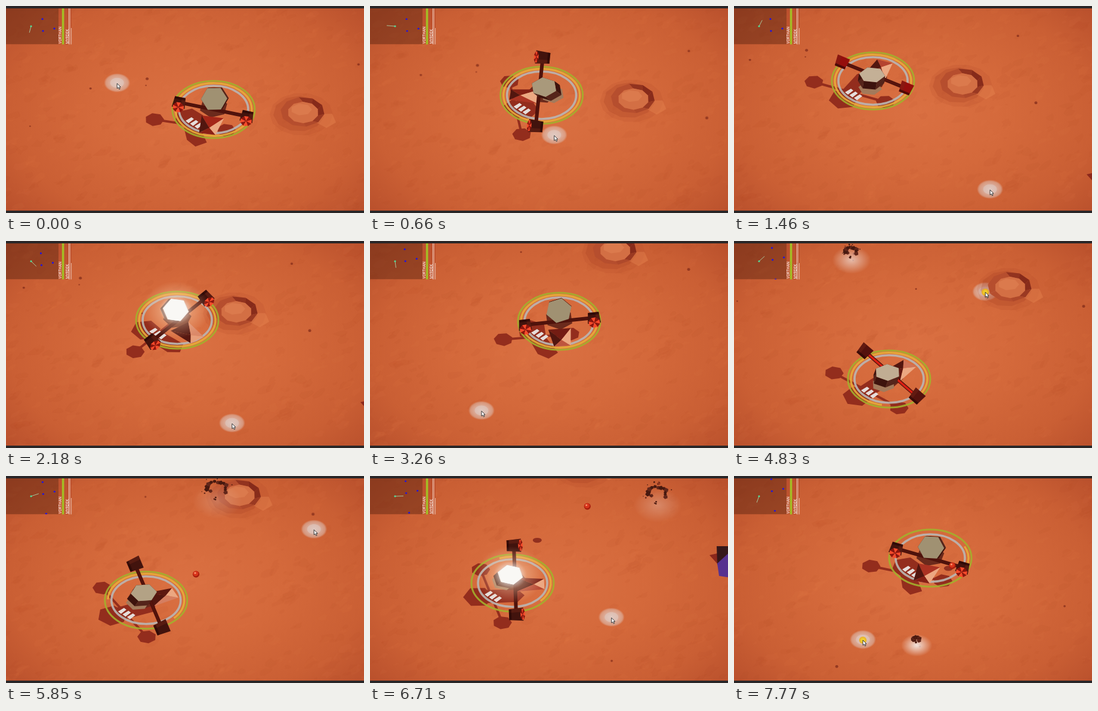
An HTML page with a canvas for the animation above (7810 ms loop, 600 by 348 pixels).

```html
<!DOCTYPE html>
<html lang="en">
<head>
<meta charset="utf-8">
<title>Red planet lander</title>
<style>
html, body { margin: 0; width: 100%; height: 100%; overflow: hidden; background: #2a2728; }
canvas { display: block; }
</style>
</head>
<body>
<canvas id="stage" width="600" height="348"></canvas>
<script>
const g = document.getElementById('stage').getContext('2d');
const LOOP = 7.81, FLIGHT = 0.55, ARM = 58, TAU = Math.PI * 2;
const { sin, cos, max, min, abs } = Math;

// time, ship x y, crater offset from the ship x y, heading in degrees
const SHIP = [
  [0, 348, 174, 149, 4, 101.5],
  [1.46, 233, 126, 149, 4, 292],
  [2.18, 287, 133, 98, -15, 411],
  [3.26, 317, 135, 93, -120, 444],
  [4.1, 330, 205, 150, -138, 560],
  [4.83, 260, 232, 202, -155, 671],
  [6.71, 239, 180, 121, -200, 718],
  [7.77, 329, 138, 180, -250, 826]
];
const CURSOR = [
  [0, 186, 130], [1.46, 429, 309], [2.18, 379, 307], [3.26, 187, 286], [4.1, 215, 22],
  [4.83, 421, 86], [5.7, 520, 110], [6.35, 455, 20], [6.71, 405, 238], [7.2, 215, 335], [7.77, 216, 276]
];
const CLICKS = [4.1, 4.85, 5.75, 6.43, 7.22, 7.76];
const THRUST = [[1.85, 2.5], [3.8, 4.3], [6.35, 7.05]];

function random(seed) {
  return () => (seed = (seed * 16807) % 2147483647) / 2147483647;
}

// smooth interpolation through rows of [time, ...values]
function track(rows, t) {
  let i = 0;
  while (i < rows.length - 2 && t > rows[i + 1][0]) i++;
  const a = rows[i], b = rows[i + 1], d = b[0] - a[0], u = min(1, (t - a[0]) / d);
  const p = rows[max(0, i - 1)], n = rows[min(rows.length - 1, i + 2)];
  return a.slice(1).map((v, k) => {
    const w = b[k + 1];
    const m0 = (w - p[k + 1]) / (b[0] - p[0]) * d, m1 = (n[k + 1] - v) / (n[0] - a[0]) * d;
    const u2 = u * u, u3 = u2 * u;
    return v * (2 * u3 - 3 * u2 + 1) + m0 * (u3 - 2 * u2 + u) + w * (3 * u2 - 2 * u3) + m1 * (u3 - u2);
  });
}

// each click sends a shot to the spot under the cursor, kept relative to the crater
const SHOTS = CLICKS.map(at => {
  const [x, y, rx, ry] = track(SHIP, at), [px, py] = track(CURSOR, at);
  return { at, x: px - x - rx, y: py - y - ry };
});

const mix = (a, b, u) => a.map((v, i) => v + (b[i] - v) * max(0, min(1, u)));
const rgb = c => `rgb(${c.map(Math.round)})`;
const white = a => `rgba(245,240,238,${a})`;

function poly(points, fill, c = g) {
  c.beginPath();
  points.forEach(p => c.lineTo(p[0], p[1]));
  c.closePath();
  c.fillStyle = fill;
  c.fill();
}

function oval(x, y, rx, ry, fill) {
  g.beginPath();
  g.ellipse(x, y, rx, ry, 0, 0, TAU);
  g.fillStyle = fill;
  g.fill();
}

function ngon(x, y, rx, ry, n, turn = 0) {
  return Array.from({ length: n }, (_, i) => {
    const a = turn + i * TAU / n;
    return [x + rx * cos(a), y + ry * sin(a)];
  });
}

// the faces between two matching outlines
function band(outer, inner, color) {
  outer.forEach((p, i) => {
    const j = (i + 1) % outer.length;
    poly([p, outer[j], inner[j], inner[i]], color(i));
  });
}

function line(x1, y1, x2, y2, width, color) {
  g.beginPath();
  g.moveTo(x1, y1);
  g.lineTo(x2, y2);
  g.lineWidth = width;
  g.strokeStyle = color;
  g.stroke();
}

function arc(x, y, rx, ry, from, to, width, color) {
  g.beginPath();
  g.ellipse(x, y, rx, ry, 0, from, to);
  g.lineWidth = width;
  g.strokeStyle = color;
  g.stroke();
}

// soft elliptical light
function glow(x, y, rx, ry, stops) {
  g.save();
  g.translate(x, y);
  g.scale(1, ry / rx);
  const r = g.createRadialGradient(0, 0, 0, 0, 0, rx);
  stops.forEach(([at, color]) => r.addColorStop(at, color));
  g.fillStyle = r;
  g.fillRect(-rx, -rx, rx * 2, rx * 2);
  g.restore();
}

// mottled soil and pebbles, fixed to the world
const soil = document.createElement('canvas');
soil.width = 880;
soil.height = 780;
{
  const c = soil.getContext('2d'), r = random(77);
  for (let i = 0; i < 1800; i++) {
    const x = r() * 880, y = r() * 780, w = 3 + r() * 12, a = -0.7 + r() * 0.5;
    const pts = ngon(0, 0, w, w * 0.5, 9).map(([px, py]) => {
      const k = 0.4 + r() * 0.9;
      return [x + (px * cos(a) - py * sin(a)) * k, y + (px * sin(a) + py * cos(a)) * k];
    });
    poly(pts, i % 2 ? 'rgba(165,60,30,.06)' : 'rgba(235,140,85,.06)', c);
  }
  for (let i = 0; i < 16; i++) {
    const s = 1.3 + r() * 1.6;
    poly(ngon(r() * 880, r() * 780, s, s * 0.9, 6), 'rgba(125,40,24,.7)', c);
  }
}

function ground(cx, cy) {
  g.fillStyle = '#cf6437';
  g.fillRect(0, 0, 600, 348);
  glow(305, 178, 400, 260, [[0, '#da7042'], [0.4, '#d4693b'], [0.75, '#ca5f34'], [1, '#b9502c']]);
  g.drawImage(soil, cx - 570, cy - 240);
}

function crater(x, y) {
  poly(ngon(x - 2, y + 4, 53, 36, 14), 'rgba(170,65,35,.14)');
  poly(ngon(x - 6, y + 3, 43, 30, 11, 0.2), 'rgba(165,62,34,.25)');
  poly(ngon(x + 40, y + 14, 17, 13, 5, 0.3), 'rgba(231,132,82,.4)');
  const n = 10, outer = ngon(x, y, 37, 25, n, 0.15), inner = ngon(x + 1, y + 1, 26, 18, n, 0.3);
  band(outer, inner, i => rgb(mix([182, 78, 46], [134, 42, 26], cos(i * TAU / n + 0.95) + 0.15 * (i % 3))));
  poly(inner, '#d36f44');
  poly(ngon(x - 2, y - 4, 18, 10, 7), 'rgba(235,145,98,.3)');
}

function blast(x, y, age) {
  if (age < 0 || age > 1) return;
  const fade = max(0, 1 - age * 1.7), size = 26 + age * 34;
  glow(x, y, size, size * 0.72, [[0, white(0.9 * fade)], [0.45, white(0.5 * fade)], [1, white(0)]]);
  const r = random(41), spread = 5 + age * 27, cy = y - 10 - age * 25;
  g.globalAlpha = min(1, 2.6 - age * 2.6);
  for (let i = 0; i < 24; i++) {
    const big = i < 13, a = big ? Math.PI * (0.85 + i / 9) : r() * TAU;
    const d = spread * (big ? 0.75 + r() * 0.3 : 1.1 + r() * 0.5), s = big ? 2.5 + r() * 2.5 : 0.8 + r();
    poly(ngon(x + cos(a) * d, cy + sin(a) * d * 0.75, s, s * 0.9, 5, a), i % 3 ? '#47190f' : '#61261a');
  }
  g.globalAlpha = 1;
}

function ball(shot, t, x, y, cx, cy, isShadow) {
  const u = (t - shot.at) / FLIGHT;
  if (u < 0 || u > 1) return;
  const sx = x + 40, sy = y + 15, h = 4 * u * (1 - u);
  const bx = sx + (cx + shot.x - sx) * u, by = sy + (cy + shot.y - sy) * u - 60 * h;
  if (isShadow) return oval(bx - 84 * h, by + 57 * h, 7.5, 4.2, '#91301f');
  oval(bx, by, 5.6, 5.6, '#a81c0d');
  oval(bx - 0.5, by - 1, 4.4, 4.2, '#d9351b');
  oval(bx - 1.5, by - 2, 1.5, 1.4, '#ff9872');
}

function shadows(x, y, h, ends) {
  const color = '#932d1d', c = cos(h), s = sin(h);
  const px = x - 44 - 14 * c, py = y + 23 - 8 * s, qx = x - 22 + 30 * c, qy = y + 22 + 32 * s;
  const drops = ends.map(([ex, ey]) => [ex - 38 + 0.28 * (ey - y), ey + 26 - 0.23 * (ey - y)]);
  line(...drops[0], ...drops[1], 4, color);
  drops.forEach(([dx, dy]) => poly(ngon(dx, dy, 16, 11, 7, h), color));
  poly(ngon(px, py, 25, 17, 6, h), color);
  poly([[px - 13 * s, py + 11 * c], [qx - 17 * s, qy + 11 * c], [qx + 12 * c, qy + 9 * s],
    [qx + 17 * s, qy - 11 * c], [px + 13 * s, py - 11 * c]], color);
}

function gauges(x, y, t) {
  arc(x, y, 69, 48, 0, TAU, 3, 'rgba(164,176,45,.9)');
  const fuel = min(1, 1 - 0.22 * (t - 4.1)) * TAU;
  arc(x, y, 64, 44.3, 0.75 - fuel, 0.75, 3.4, 'rgba(232,172,57,.9)');
  arc(x, y, 58, 40, 0, TAU, 3.6, 'rgba(187,181,176,.92)');
  for (let i = 0; i < 3; i++) {
    const bx = x - 40 + i * 7.5, by = y + 18 + i * 4.7;
    poly([[bx - 7, by + 1], [bx + 3, by - 5], [bx + 7, by - 2], [bx - 2, by + 5]], '#e6dedb');
  }
}

// facet colour from the way it faces
function facet(angle) {
  const v = cos(angle - 0.2);
  return rgb(v < 0 ? mix([82, 22, 15], [164, 38, 24], v + 0.7) : mix([164, 38, 24], [236, 168, 130], v * 1.2));
}

function nose(x, y, h) {
  const c = cos(h), s = sin(h);
  const at = (f, l) => [x + f * c - l * s, y + 3 + 6 * s + (f * s + l * c) * 0.62];
  const tip = at(36, 0), base = [at(6, -19), at(53, -14), at(53, 14), at(6, 19)];
  [[3, 0, Math.PI], [0, 1, -Math.PI / 2], [2, 3, Math.PI / 2], [1, 2, 0]].forEach(([i, j, turn]) =>
    poly([base[i], base[j], tip], facet(h + turn)));
}

function engine(x, y, h) {
  const s = sin(h), l = 12 - 3 * s * s, red = max(0, cos(h + 1.3)) ** 16;
  g.save();
  g.translate(x, y);
  g.rotate(h);
  poly([[-l, -9], [l, -11], [l, 11], [-l, 9]], rgb(mix([66, 19, 13], [158, 13, 12], red)));
  poly([[-l, -9], [l, -11], [l, -4], [-l, -3]], 'rgba(120,40,25,.4)');
  poly([[-l, 9], [-l, -9], [4 - l, -9], [4 - l, 9]], 'rgba(35,5,3,.6)');
  if (s > -0.3) {
    const rim = ngon(l - 1, 0, 4 + 5 * s * s, 10, 8, 0.3);
    rim.forEach((p, i) => poly([[l - 1, 0], p, rim[(i + 1) % 8]], i % 2 ? '#f8492a' : '#8e150d'));
  }
  g.restore();
}

function pod(x, y, h, power) {
  const c = cos(h), s = sin(h), px = x - 4 * c, py = y - 14 - 4 * s;
  const dx = 1 - 8 * c, dy = 6 - 7 * s, ry = 17 + 4 * s, turn = h + 0.3;
  poly(ngon(px + dx * 1.6, py + dy * 1.8, 20, ry * 0.9, 6, turn), '#a37a5b');
  const low = ngon(px + dx, py + dy, 22, ry, 6, turn), top = ngon(px, py, 22, ry, 6, turn);
  band(top, low, i => i % 2 ? '#55241a' : '#3d130d');
  const tan = mix([160, 145, 114], [196, 176, 150], 0.15 - s);
  poly(top, rgb(mix(tan, [248, 247, 243], power)));
  if (!power) return;
  glow(px, py, 56, 48, [[0, white(power)], [0.3, white(0.7 * power)], [0.5, `rgba(255,220,185,${0.35 * power})`], [1, 'rgba(255,220,185,0)']]);
  poly(ngon(px, py, 20, ry, 6, turn), `rgba(249,248,245,${power})`);
}

function ship(x, y, h, ends, power) {
  const red = max(0, cos(h + 0.82)) ** 40;
  poly(ngon(x, y - 4, 24, 18, 6, h), '#6b2a1c');
  nose(x, y, h);
  line(...ends[0], ...ends[1], 6, '#4d110b');
  line(...ends[0], ...ends[1], 3.5, rgb(mix([80, 19, 12], [222, 30, 18], red)));
  ends.forEach(e => engine(...e, h));
  pod(x, y, h, power);
}

function block(x, y) {
  poly([[x - 13, y - 12], [x + 5, y - 16], [x + 5, y + 8]], '#8b281c');
  poly([[x - 1, y - 27], [x + 50, y - 27], [x + 50, y + 2], [x, y + 4]], '#351719');
  poly([[x, y + 2], [x + 22, y - 18], [x + 50, y - 18], [x + 50, y + 30], [x + 3, y + 23]], '#56318f');
}

function spot(x, y) {
  const light = a => `rgba(226,222,222,${a})`;
  glow(x, y - 1, 22, 16, [[0, light(0.82)], [0.5, light(0.72)], [0.54, light(0.56)], [0.84, light(0.4)], [1, light(0)]]);
}

function pointer(x, y, t) {
  if (CLICKS.some(k => abs(t - k) < 0.09)) {
    oval(x, y, 6.3, 6, 'rgba(236,178,28,.9)');
    oval(x, y, 4, 3.8, 'rgba(240,215,50,.7)');
  }
  g.beginPath();
  [[0, 0], [0, 8.5], [2, 6.8], [3.5, 9.8], [5, 9.1], [3.6, 6.2], [6, 6]].forEach(p => g.lineTo(x + p[0], y + p[1]));
  g.closePath();
  g.fillStyle = '#fff';
  g.strokeStyle = '#222';
  g.lineWidth = 0.9;
  g.fill();
  g.stroke();
}

function label(text, x) {
  g.save();
  g.translate(x, 63.5);
  g.rotate(-Math.PI / 2);
  g.font = '6.3px Roboto, Arial, sans-serif';
  g.fillStyle = '#fff';
  g.fillText(text, 0, 0);
  g.restore();
}

function hud(rx, ry, h) {
  g.save();
  g.beginPath();
  g.rect(0, 4, 110, 60.5);
  g.clip();
  g.fillStyle = 'rgba(80,30,14,.42)';
  g.fillRect(0, 4, 88, 60.5);
  g.fillStyle = 'rgba(185,75,45,.55)';
  g.fillRect(88, 4, 22, 60.5);
  const mx = (rx - 149) / 20, my = (ry - 4) / 15.5;
  [[61, 22], [62, 42], [81, 38], [67, 75]].forEach(([x, y]) => oval(x + mx, y + my, 1.6, 1.4, '#1a12e8'));
  line(42, 34, 42 + 14 * cos(h), 34 + 11 * sin(h), 1, '#a9c59c');
  oval(42, 34, 1.6, 1.5, '#4fe09a');
  g.fillStyle = '#a3bd25';
  g.fillRect(93.8, 4, 3.6, 61);
  line(105.5, 4, 105.5, 65, 1, '#f3d5c6');
  line(107.5, 4, 107.5, 65, 1, '#e4a58b');
  line(109.5, 37, 109.5, 65, 1, '#e9b8a2');
  label('VORTHAN', 93.3);
  label('MYRDEK', 104.5);
  g.restore();
}

function draw(t) {
  const [x, y, rx, ry, deg] = track(SHIP, t), [px, py] = track(CURSOR, t);
  const h = deg * TAU / 360, cx = x + rx, cy = y + ry;
  const mx = x + 4 * cos(h), my = y - 5 + 5 * sin(h), ax = -sin(h) * ARM, ay = cos(h) * ARM;
  const ends = [[mx + ax, my + ay], [mx - ax, my - ay]];
  const power = max(0, ...THRUST.map(([a, b]) => min(1, (t - a) / 0.12, (b - t) / 0.12)));

  ground(cx, cy);
  spot(px, py);
  crater(cx, cy);
  block(cx + 222, cy + 165);
  SHOTS.forEach(s => ball(s, t, x, y, cx, cy, true));
  SHOTS.forEach(s => blast(cx + s.x, cy + s.y, t - s.at - FLIGHT));
  shadows(x, y, h, ends);
  gauges(x, y, t);
  ship(x, y, h, ends, power);
  SHOTS.forEach(s => ball(s, t, x, y, cx, cy, false));
  pointer(px, py, t);
  hud(rx, ry, h);
  g.fillStyle = '#2a2728';
  g.fillRect(0, 0, 600, 4);
  g.fillRect(0, 344, 600, 4);
}

const start = performance.now();
function frame() {
  draw((performance.now() - start) / 1000 % LOOP);
  requestAnimationFrame(frame);
}
frame();
</script>
</body>
</html>
```
